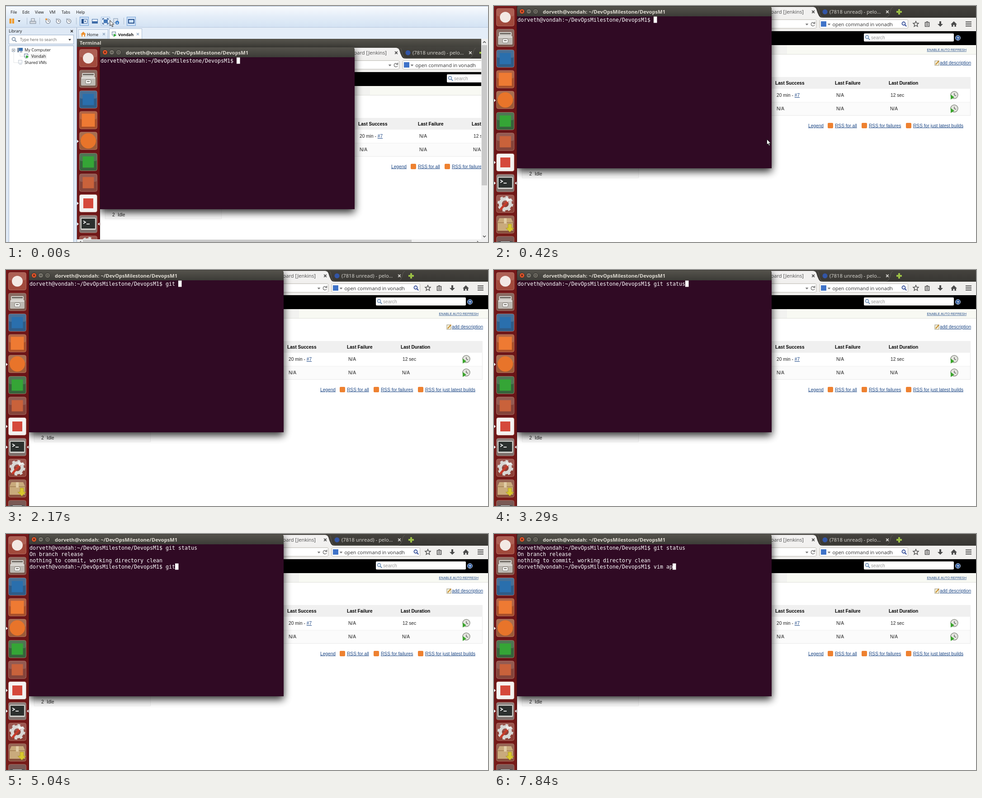
An HTML page that plays this animation: 1066x525 px, repeating every 8000 ms.

```html
<!DOCTYPE html>
<html lang="en">
<head>
<meta charset="utf-8">
<title>Terminal session</title>
<style>
html, body { margin: 0; width: 100%; height: 100%; overflow: hidden; background: #fff; }
svg { display: block; width: 1066px; height: 525px; }
text { white-space: pre; }
.ui { font-family: "Open Sans", "Noto Sans", sans-serif; }
.web { font-family: "Liberation Sans", Arial, sans-serif; }
.mono { font-family: "DejaVu Sans Mono", monospace; }
</style>
</head>
<body>
<svg id="stage" viewBox="0 0 1066 525"></svg>
<script>
const LOOP = 8000, STEP = 70;
const USER = 'dorveth', HOST = 'vondah', GUEST = 'Vondah';
const FOLDER = '~/DevOpsMilestone/DevopsM1';
const PROMPT = `${USER}@${HOST}:${FOLDER}$ `;
const CELL = 7, LINE = 14;

const rect = (x, y, w, h, fill, more = '') =>
  `<rect x="${x}" y="${y}" width="${w}" height="${h}" fill="${fill}" ${more}/>`;
const circle = (x, y, r, fill, more = '') =>
  `<circle cx="${x}" cy="${y}" r="${r}" fill="${fill}" ${more}/>`;
const fillPath = (d, fill, more = '') => `<path d="${d}" fill="${fill}" ${more}/>`;
const line = (d, color, width = 1, more = '') =>
  `<path d="${d}" fill="none" stroke="${color}" stroke-width="${width}" ${more}/>`;
const label = (font, x, y, s, size, fill, more = '') =>
  `<text class="${font}" x="${x}" y="${y}" font-size="${size}" fill="${fill}" ${more}>${s}</text>`;
const ui = (...a) => label('ui', ...a);
const web = (x, y, s, more = '', size = 10.2, fill = '#222') => label('web', x, y, s, size, fill, more);
const link = (x, y, s, size) => web(x, y, s, 'text-decoration="underline"', size, '#204a87');
const group = (id, body, more = '') => `<g id="${id}" ${more}>${body}</g>`;
const gradient = (id, ...colors) => `<linearGradient id="${id}" x2="0" y2="1">${colors.map((c, i) =>
  `<stop offset="${i / (colors.length - 1)}" stop-color="${c}"/>`).join('')}</linearGradient>`;
const cross = (x, y, r, color, width = 1.5) =>
  line(`M${x - r} ${y - r}l${2 * r} ${2 * r}m0 ${-2 * r}l${-2 * r} ${2 * r}`, color, width);
const down = (x, y, r, color) => fillPath(`M${x - r} ${y - r / 2}h${2 * r}l${-r} ${r * 1.2}z`, color);
const lens = (x, y, color) =>
  circle(x, y, 3.6, '#eef4fb', `stroke="${color}" stroke-width="1.6"`) + line(`M${x + 2.6} ${y + 2.6}l3.6 3.6`, color, 2);
const play = (x, y) => fillPath(`M${x} ${y}v8l7-4z`, '#27a52c', 'stroke="#fff" stroke-width=".6"');
const screen = (x, y) =>
  rect(x + .5, y + .5, 8, 7, '#e9eef5', 'stroke="#6c7f99"') + rect(x + 2, y + 9, 6, 1.5, '#8c9bb0');

function hostWindow() {
  const menus = [[10, 'File'], [36, 'Edit'], [64, 'View'], [96, 'VM'], [123, 'Tabs'], [155, 'Help']];
  const clock = (x, color) => circle(x, 34, 4.8, '#f5f7fa', 'stroke="#7c8796" stroke-width="1.3"') +
    line(`M${x} 31v3h2.5`, '#555') + circle(x - 4, 29.5, 2, color);
  const pane = x => rect(x + .5, 29.5, 12, 9, '#f4f8fd', 'stroke="#3e6ca8"');
  const tools = menus.map(([x, s]) => ui(x, 17, s, 9, '#111')).join('') +
    rect(7.5, 28, 4.5, 11, '#ef9b2d') + rect(13.5, 28, 4.5, 11, '#ef9b2d') + down(29, 33.5, 3, '#222') +
    [46.5, 74.5, 155.5, 260.5].map(x => line(`M${x} 26v15`, '#aebdd0')).join('') +
    rect(56, 28, 7, 6, '#e6e9ee', 'stroke="#7b8796"') + rect(53, 34, 13, 5, '#d3d8df', 'stroke="#7b8796"') +
    clock(93, '#e9902e') + clock(116, '#a6b0bd') + clock(139, '#a6b0bd') +
    rect(163.5, 24.5, 19, 19, '#cfe0f5', 'stroke="#6f9fd6"') + rect(267.5, 24.5, 19, 19, '#cfe0f5', 'stroke="#6f9fd6"') +
    rect(210.5, 24.5, 19, 19, '#e3eefb', 'stroke="#a4c1e2"') +
    pane(167) + rect(167, 29, 5, 10, '#24508c') + fillPath('M174 31.5v5l3-2.5z', '#24508c') +
    pane(190) + rect(190, 34, 13, 5, '#3e6ca8') +
    rect(216, 30, 9, 8, '#4579b8') + line('M214 31v-3h3m6 0h3v3m0 6v3h-3m-6 0h-3v-3', '#24508c', 1.4) +
    rect(238, 28, 9, 9, '#dfe7f1', 'stroke="#7e93ae"') + circle(246, 37, 4.2, '#3f7fc6') + line('M246 36v4', '#fff', 1.5) +
    rect(270, 29, 14, 10, '#24508c') + rect(272, 31, 10, 6, '#cfe3fa');
  const library = ui(6, 59, 'Library', 9, '#111') + cross(145.5, 56, 2.5, '#222', 1.3) +
    rect(6.5, 64.5, 143, 20, '#fff', 'stroke="#9db2cc"') + lens(17, 73.5, '#8193a8') +
    ui(31, 78, 'Type here to search', 8.9, '#666') + down(141, 75, 3, '#222') +
    rect(6.5, 88.5, 143, 440, '#fff', 'stroke="#9db2cc"') +
    line('M20.5 98H27M17 102v24h10M31 104v8h8', '#c3c8ce', 1, 'stroke-dasharray="1 1"') +
    rect(13.5, 95.5, 6, 6, '#fff', 'stroke="#8a99ab"') + line('M15 98.5h3', '#333') +
    rect(25, 93, 4, 10, '#7f8fa3') + rect(29, 93, 8, 7, '#3a70b0') + rect(31, 101, 5, 2, '#8493a8') +
    ui(41, 101, 'My Computer', 9.1, '#111') + rect(54, 106, 36, 12, '#f1f1f1') +
    screen(40, 106) + play(44, 109) + ui(56, 115, GUEST, 9, '#111') +
    `<g opacity=".4">${screen(27, 120)}</g>` + ui(41, 129, 'Shared VMs', 8.9, '#111');
  const tabs = rect(157, 48, 909, 26, '#e4edf8') +
    rect(160.5, 52.5, 65, 22, 'url(#tab)', 'stroke="#a9bdd5"') + rect(228.5, 50.5, 72, 24, '#fff', 'stroke="#a9bdd5"') +
    fillPath('M165 63l6-6 6 6h-2v5h-8v-5z', '#ec9130') + rect(169.5, 64, 3, 4, '#fff') +
    ui(179, 66.5, 'Home', 8.9, '#111') + cross(216.5, 62.5, 2.5, '#8aa2bd', 1.3) +
    screen(234, 57) + play(238, 61) + ui(248, 66.5, GUEST, 9, '#111', 'font-weight="700"') +
    cross(291.5, 62.5, 2.5, '#8aa2bd', 1.3);
  const bars = rect(1051, 73, 15, 459, '#f0f0f0') + rect(1052, 87, 12, 312, '#c9c9c9') +
    rect(157, 519, 894, 13, '#f0f0f0') + rect(170, 520, 727, 11, '#c9c9c9') +
    line('M1055 82l3-3 3 3M1055 511l3 3 3-3M166 523l-3 3 3 3M1042 523l3 3-3 3', '#444', 1.4);
  return rect(0, 0, 1090, 570, '#dfe9f5') + rect(0, 0, 1090, 48, 'url(#bar)') + line('M0 .5H1066', '#9fb3cb') +
    line('M0 47.5H1072', '#b4c6dc') + group('tools', tools) + library + tabs + line('M156.5 48V532', '#98acc6') + bars;
}

function statusBar() {
  const icons = [897, 914, 930, 946, 963, 979, 996, 1013, 1037].map((x, i) =>
    i === 1 || i === 2 ? circle(x, 519, 5, '#d2dae2', 'stroke="#8796a5"') + circle(x + 3, 522, 2, '#38a538')
      : rect(x - 5, 515, i === 6 ? 6 : 10, 8, i === 3 || i === 8 ? '#4a8ccc' : '#bcc6d1', 'stroke="#7a8795"')).join('');
  return rect(0, 0, 282, 1, '#fff') + rect(0, 512, 1066, 13, '#f2f4f7') + line('M0 511.5H1059', '#c5d2e2') +
    rect(1059, 0, 7, 525, '#eaf0f7') + rect(1060, 50, 6, 462, '#f1f1f1') + rect(1060, 88, 5, 311, '#c9c9c9') +
    line('M1059.5 0V525', '#b9c8da') + rect(1059, 0, 7, 48, '#d8e5f4') +
    ui(299, 522, 'To direct input to this VM, move the mouse pointer inside or press Ctrl+G.', 8.9, '#111', 'text-anchor="end"') + icons;
}

function launcher() {
  const square = (y, color, s = 22) => rect(25 - s / 2, y - s / 2, s, s, color);
  const art = [
    y => circle(25, y, 12, '#f3e9e4'),
    y => rect(11, y - 13, 28, 11, '#d2cfc9', 'rx="2"') + rect(13, y - 11, 24, 3, '#6f6a64') + rect(9, y - 4, 32, 19, '#bdb9b3', 'rx="2"') +
      rect(10, y - 3, 30, 2, '#efedea') + rect(19, y + 2, 12, 9, '#f6f5f3', 'rx="2" stroke="#77736d"') + rect(22, y + 5, 6, 2, '#77736d'),
    y => square(y, '#2a6fad', 25),
    y => square(y, '#ee7a33', 29),
    y => circle(25, y, 17, '#e8742a'),
    y => square(y, '#35a536', 25),
    y => square(y, '#c9623b', 25),
    y => square(y, '#d5493b'),
    y => rect(8, y - 14, 34, 27, '#cfcfca', 'rx="2"') + rect(10, y - 12, 30, 22, '#2c302e') +
      line(`M14 ${y - 7}l5 3-5 3`, '#fff', 1.7) + line(`M21 ${y}h7`, '#fff', 1.7),
    y => circle(25, y, 11, 'none', 'stroke="#d8d7d4" stroke-width="7"') +
      circle(25, y, 15.5, 'none', 'stroke="#d8d7d4" stroke-width="4" stroke-dasharray="6 6.17"') +
      line(`M15 ${y + 12}L31 ${y - 7}`, '#c63c2b', 5, 'stroke-linecap="round"') +
      line(`M29 ${y - 5}l4-5m-6-2l5 4 6-2`, '#eeeeec', 4),
    y => fillPath(`M12 ${y - 14}h26l4 9v19H8v-19z`, '#c9aa7c') + rect(8, y - 5, 34, 2, '#ab895c') + rect(22, y - 14, 6, 12, '#e0cba5') +
      fillPath(`M31 ${y - 1}h8v9h5l-9 9-9-9h5z`, '#d7c72e', 'stroke="#9d8c18" stroke-width=".7"'),
    y => rect(9, y - 9, 32, 28, '#4f5355', 'rx="2"') + rect(15, y - 8, 20, 12, '#e7e7e5') + rect(27, y - 6, 4, 7, '#555')
  ];
  const tints = ['#a14a3c', '#79564c', '#2f5c87', '#a64f2a', '#9c5b38', '#37623c', '#84443a', '#f3f1ef', '#7d706c', '#8d4037', '#87503c', '#68423d'];
  const tiles = art.map((draw, i) => {
    const y = Math.round(25 + 46.1 * i);
    return rect(5.5, y - 19.5, 39, 39, tints[i], 'rx="4" stroke="#c48e81" stroke-opacity=".65"') +
      rect(6, y - 19, 38, 17, '#fff', 'rx="4" fill-opacity=".12"') + draw(y);
  }).join('');
  const marks = [210, 348, 394].map(y => fillPath(`M0 ${y - 3.5}l4 3.5-4 3.5z`, '#eee')).join('');
  return rect(0, 0, 51, 545, 'url(#dock)') + line('M50.5 0V545', '#3d0d10') + tiles + marks +
    fillPath('M50 390.5l-4 3.5 4 3.5z', '#eee');
}

function browser() {
  const feed = (x, s) => rect(x, 260, 12, 12, '#ee8130', 'rx="2"') + link(x + 16, 269.5, s);
  const build = y => circle(1018, y - 1, 8, '#e4e5df', 'stroke="#8c8f87" stroke-width="1.4"') +
    line(`M1018 ${y - 5}v4l4 2`, '#555', 1.3) + fillPath(`M1010 ${y - 2}v11l8-5z`, '#3ba42d');
  const gray = '#4c4c4c';
  const chrome = rect(0, 0, 1066, 26, 'url(#strip)') +
    fillPath('M560 2H704C714 2 713 9 716 16S720 26 728 26H560z', '#f2f1f0') +
    ui(685, 17, 'Dashboard [Jenkins]', 11.2, gray, 'text-anchor="end"') + cross(706, 13, 2.8, gray, 1.7) +
    line('M716 3c4 4 2 22 12 22H866c12 0 9-22 16-22', '#615e57') + circle(732, 13, 5.5, '#3355a5') +
    ui(742, 17, '(7818 unread) - pelo…', 11.2, '#dedcd6') + cross(870, 13, 2.8, '#d8d6d0', 1.7) +
    line('M896 7v12M890 13h12', '#9bbf45', 4) +
    rect(0, 26, 1066, 30, '#f0efed') + rect(500.5, 30.5, 212, 19, '#fff', 'rx="2" stroke="#bbb8b2"') +
    down(692, 41, 3.3, '#777') + line('M709 39a4 4 0 1 0 0 3M709.5 35v4h-4', '#777', 1.4) +
    rect(720.5, 30.5, 195, 19, '#fff', 'rx="2" stroke="#bbb8b2"') + rect(723, 34, 12, 12, '#3f73c8') +
    down(741, 41, 3.3, '#777') + ui(748.5, 44.5, 'open command in vonadh', 10.9, '#333') + lens(906, 39, '#27408f') +
    line('M933 34l1.8 4 4.2.4-3.2 2.8 1 4.3-3.8-2.3-3.8 2.3 1-4.3-3.2-2.8 4.2-.4z', gray, 1.4) +
    rect(953.5, 36.5, 9, 9, 'none', `stroke="${gray}" stroke-width="1.5"`) + line('M955.5 39.5h5m-5 3h5M956 35h4', gray, 1.4) +
    fillPath('M985 34h4v6h4l-6 6-6-6h4z', gray) + fillPath('M1010 41l7-7 7 7h-2v5h-3.5v-4h-3v4H1012v-5z', gray) +
    line('M1043 35.5h13m-13 4.5h13m-13 4.5h13', gray, 2);
  const page = rect(0, 56, 1066, 489, '#fff') + rect(0, 56, 1066, 31, '#000') +
    rect(818, 61, 199, 18, '#fff', 'rx="2"') + lens(825, 69, '#6b8db4') + web(834, 74, 'search', '', 10.2, '#999') +
    circle(1026, 71, 5.5, '#315c9d', 'stroke="#c9d6e9"') + web(1026, 74.5, '?', 'text-anchor="middle" font-weight="700"', 9, '#fff') +
    rect(0, 87, 1066, 20, '#f8f9f3') + rect(0, 87, 648, 20, '#f2f2f0') + line('M0 107.5H1066', '#dfe0da') +
    link(957.5, 100, 'ENABLE AUTO REFRESH', 7.3) +
    rect(975, 122, 9, 10, '#f6f2dc', 'stroke="#9a947b"') + line('M977 130l7-8', '#c78b2b', 2) + link(986, 130, 'add description') +
    rect(340.5, 158.5, 713, 85, '#fff', 'stroke="#e9e9e9"') + rect(341, 158, 713, 26, '#f0f0f0') +
    rect(341, 214, 712, 29, '#fbfbfb') + line('M341 214H1053', '#eeeeee') +
    [[622, 'Success'], [754, 'Failure'], [873, 'Duration']].map(([x, s]) =>
      web(x, 175, 'Last ' + s, 'font-weight="700"', 10.1, '#000')).join('') +
    web(625, 202, '20 min - ') + link(664.8, 202, '#7') + web(757, 202, 'N/A') + web(877, 202, '12 sec') +
    [625, 757, 876].map(x => web(x, 232, 'N/A')).join('') + build(199) + build(229) + link(695, 269.5, 'Legend') +
    feed(738, 'RSS for all') + feed(813, 'RSS for failures') + feed(911, 'RSS for just latest builds') +
    rect(62.5, 350.5, 257, 32, '#fcfcfc', 'stroke="#eeeeee"') + web(78, 377, '2') + web(90, 377, 'Idle');
  return chrome + page;
}

function terminal() {
  const button = (x, fill) => circle(x, 12, 5.6, fill, 'stroke="#2f2e2a"');
  return rect(51, 1, 563, 360, '#000', 'filter="url(#shadow)"') + fillPath('M51 23V6q0-5 5-5H609q5 0 5 5V23z', 'url(#title)') +
    rect(51, 23, 563, 338, '#300a24') + button(62, '#e2562b') + cross(62, 12, 2, '#572012', 1.2) +
    button(77, '#77746b') + line('M74.5 12h5', '#34332e', 1.2) + button(92, '#77746b') +
    rect(90, 10, 4, 4, 'none', 'stroke="#34332e"') +
    ui(108, 16.5, `${USER}@${HOST}: ${FOLDER}`, 11.1, '#dfdbd2', 'font-weight="700"') +
    [0, 1, 2, 3].map(i => label('mono', 52, 35 + LINE * i, '', 11.63, '#fff', `id="row${i}"`)).join('') +
    rect(0, 0, CELL + .5, LINE, '#fff', 'id="caret"');
}

const stage = document.getElementById('stage');
stage.innerHTML = `<defs>
  ${gradient('bar', '#f9fbfe', '#e3edf8', '#d3e2f3')}${gradient('tab', '#f4f8fd', '#d9e6f5')}
  ${gradient('dock', '#74191a', '#681417', '#791d19')}${gradient('title', '#55534c', '#3c3b37')}
  ${gradient('strip', '#45433e', '#373632')}${gradient('panel', '#55534c', '#403f3a')}
  <filter id="shadow" x="-10%" y="-10%" width="120%" height="125%"><feGaussianBlur stdDeviation="9"/>
    <feOffset dy="7"/><feComponentTransfer><feFuncA type="linear" slope=".85"/></feComponentTransfer></filter>
  <clipPath id="view"><rect id="viewport" x="0" y="-18"/></clipPath></defs>` +
  group('host', hostWindow()) +
  group('desk', rect(0, -18, 1066, 19, 'url(#panel)') + ui(6, -5, 'Terminal', 10.8, '#dfdbd2', 'font-weight="700"') +
    browser() + terminal() + launcher(), 'clip-path="url(#view)"') +
  group('status', statusBar()) +
  group('arrow', fillPath('M0 0V12l2.8-2.5 2 4.6 2-.9-2-4.4H8.5z', '#fff', 'stroke="#111" stroke-width=".9"')) +
  group('beam', line('M-2.5-5.5h2l.5.5.5-.5h2M0-5V5M-2.5 5.5h2L0 5l.5.5h2', '#ddd', 1.1));

const $ = id => document.getElementById(id);
const show = (id, on) => $(id).setAttribute('display', on ? 'inline' : 'none');
const move = (id, x, y) => $(id).setAttribute('transform', `translate(${x} ${y})`);

// Key presses; "<" deletes the last character.
const firstKeys = [[1820, 'g'], [1960, 'i'], [2030, 't'], [2170, ' '], [2450, 's'], [2520, 't'], [2660, 'a'], [2730, 't'], [3010, 'u'], [3290, 's']];
const secondKeys = [[4760, 'g'], [4970, 'i'], [5040, 't'], [5460, ' '], [6510, '<'], [6860, '<'], [6930, '<'], [7070, '<'],
  [7280, 'v'], [7420, 'i'], [7560, 'm'], [7700, ' '], [7770, 'a'], [7840, 'p']];
const typed = (keys, t) => keys.reduce((s, [at, key]) => at > t ? s : key === '<' ? s.slice(0, -1) : s + key, '');
const within = (t, a, b) => t >= a && t < b;

function drawTerminal(t) {
  const rows = [PROMPT + typed(firstKeys, t)];
  if (t >= 3710) rows.push('On branch release', 'nothing to commit, working directory clean', PROMPT + typed(secondKeys, t));
  else if (t >= 3570) rows.push('');
  for (let i = 0; i < 4; i++) $('row' + i).textContent = rows[i] || '';
  const last = rows.length - 1;
  $('caret').setAttribute('x', 52 + CELL * rows[last].length);
  $('caret').setAttribute('y', 23.5 + LINE * last);
  show('caret', !within(t, 3920, 4340) && !within(t, 5950, 6440));
}

function drawWindow(t) {
  const full = t >= 420, leaving = within(t, 350, 420);
  const dx = leaving ? -6 : 0, dy = leaving ? -24 : 0;
  show('host', !full);
  show('tools', !leaving);
  show('status', leaving);
  move('host', dx, dy);
  move('desk', full ? 0 : 157 + dx, full ? 0 : 91 + dy);
  $('viewport').setAttribute('width', full ? 1066 : 894);
  $('viewport').setAttribute('height', full ? 543 : 446);
}

function drawPointer(t) {
  show('arrow', t < 490);
  show('beam', within(t, 490, 1750));
  if (t < 420) move('arrow', t < 210 ? 230 : t < 280 ? 228 : 226, 32);
  else {
    const left = (1 - Math.min(1, (t - 420) / 560)) ** 2;
    move(t < 490 ? 'arrow' : 'beam', 455 + 148.5 * left, 186.5 + 110 * left);
  }
}

function draw(now) {
  const t = Math.floor((now % LOOP) / STEP) * STEP;
  drawWindow(t);
  drawTerminal(t);
  drawPointer(t);
}

const start = performance.now();
function tick() {
  draw(performance.now() - start);
  requestAnimationFrame(tick);
}
tick();
</script>
</body>
</html>
```
